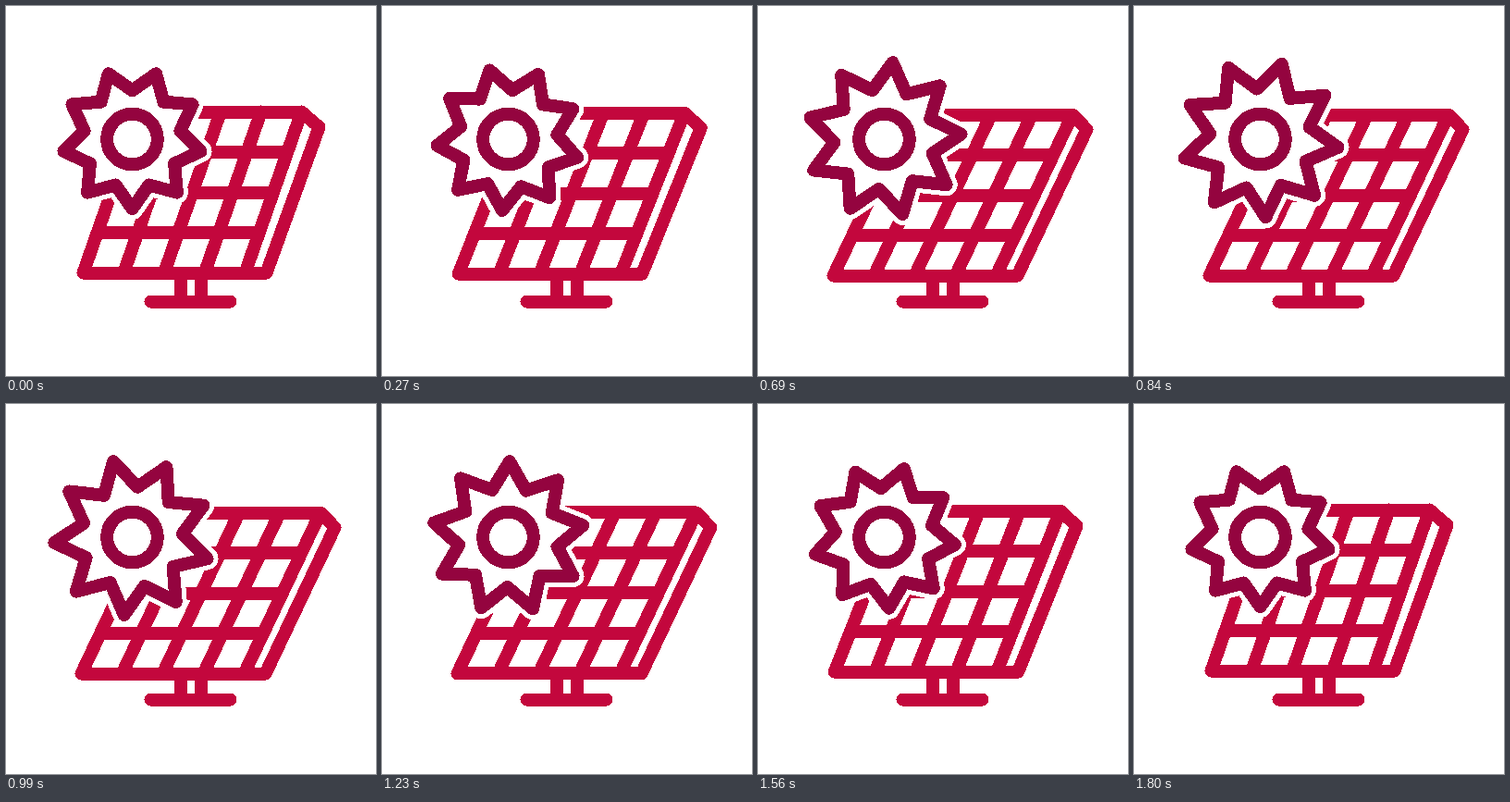
Animation of 400x400 px, one loop 1860 ms. Source, as an HTML page:

```html
<!DOCTYPE html>
<html lang="en">
<head>
<meta charset="utf-8">
<title>Solar panel</title>
<style>
  html, body { margin: 0; width: 100%; height: 100%; overflow: hidden; background: #fff; }
  svg { display: block; width: 100vw; height: 100vh; shape-rendering: crispEdges; }
  path, circle { fill: none; stroke-width: 14; stroke-linecap: round; stroke-linejoin: round; }
  .panel { stroke: #c3073d; }
  .sun { stroke: #94043f; }
  #halo { fill: #fff; stroke: #fff; stroke-width: 24; }
</style>
</head>
<body>
<svg viewBox="0 0 400 400">
  <path class="panel" d="M189 297V319.5M211 297V319.5M156.5 319.5H242.5"/>
  <path class="panel" id="panel"/>
  <path id="halo"/>
  <path class="sun" id="rays"/>
  <circle class="sun" cx="136.5" cy="144" r="27.3"/>
</svg>
<script>
  const LOOP = 1860, END = 1800, STEP = 30;
  const CENTER = [136.5, 144], RAYS = 9;
  const ROWS = 4, COLS = 4;

  // Panel corners at rest and fully tilted
  const REST = { bl: [83.5, 288.5], br: [258.5, 288.5], tr: [319.5, 114.5], sideTop: [338.5, 131], sideBottom: [281.5, 288.5] };
  const TILT = { bl: [81.5, 291.5], br: [257.5, 291.5], tr: [340, 117.5], sideTop: [355.5, 133.5], sideBottom: [280.5, 291.5] };

  const byId = id => document.getElementById(id);
  const mix = (a, b, k) => a + (b - a) * k;
  const mixPoint = (p, q, k) => [mix(p[0], q[0], k), mix(p[1], q[1], k)];
  const line = (...points) => 'M' + points.map(p => p.map(n => n.toFixed(2)).join(' ')).join('L');

  function ease(t, from, to) {
    const x = Math.min(1, Math.max(0, (t - from) / (to - from)));
    return x * x * (3 - 2 * x);
  }

  function panelPath(tilt) {
    const c = {};
    for (const key in REST) c[key] = mixPoint(REST[key], TILT[key], tilt);
    const tl = [c.bl[0] + c.tr[0] - c.br[0], c.tr[1]];
    let d = line(c.tr, c.sideTop, c.sideBottom, c.br);
    for (let i = 0; i <= ROWS; i++) d += line(mixPoint(tl, c.bl, i / ROWS), mixPoint(c.tr, c.br, i / ROWS));
    for (let i = 0; i <= COLS; i++) d += line(mixPoint(tl, c.tr, i / COLS), mixPoint(c.bl, c.br, i / COLS));
    return d;
  }

  function starPath(angle, outer, inner) {
    const points = [];
    for (let i = 0; i < RAYS * 2; i++) {
      const a = (angle + i * 180 / RAYS) * Math.PI / 180;
      const r = i % 2 ? inner : outer;
      points.push([CENTER[0] + r * Math.cos(a), CENTER[1] + r * Math.sin(a)]);
    }
    return line(...points) + 'Z';
  }

  function draw(t) {
    const tilt = ease(t, 0, 660) - ease(t, 1200, END);
    const grow = ease(t, 0, 900) - ease(t, 900, END);
    const star = starPath(10 + 80 * ease(t, 0, END), mix(75.2, 84.6, grow), mix(52.7, 54.6, grow));
    byId('panel').setAttribute('d', panelPath(tilt));
    byId('halo').setAttribute('d', star);
    byId('rays').setAttribute('d', star);
  }

  const start = performance.now();
  function tick() {
    const t = (performance.now() - start) % LOOP;
    draw(Math.min(END, Math.floor(t / STEP) * STEP));
    requestAnimationFrame(tick);
  }
  tick();
</script>
</body>
</html>
```
